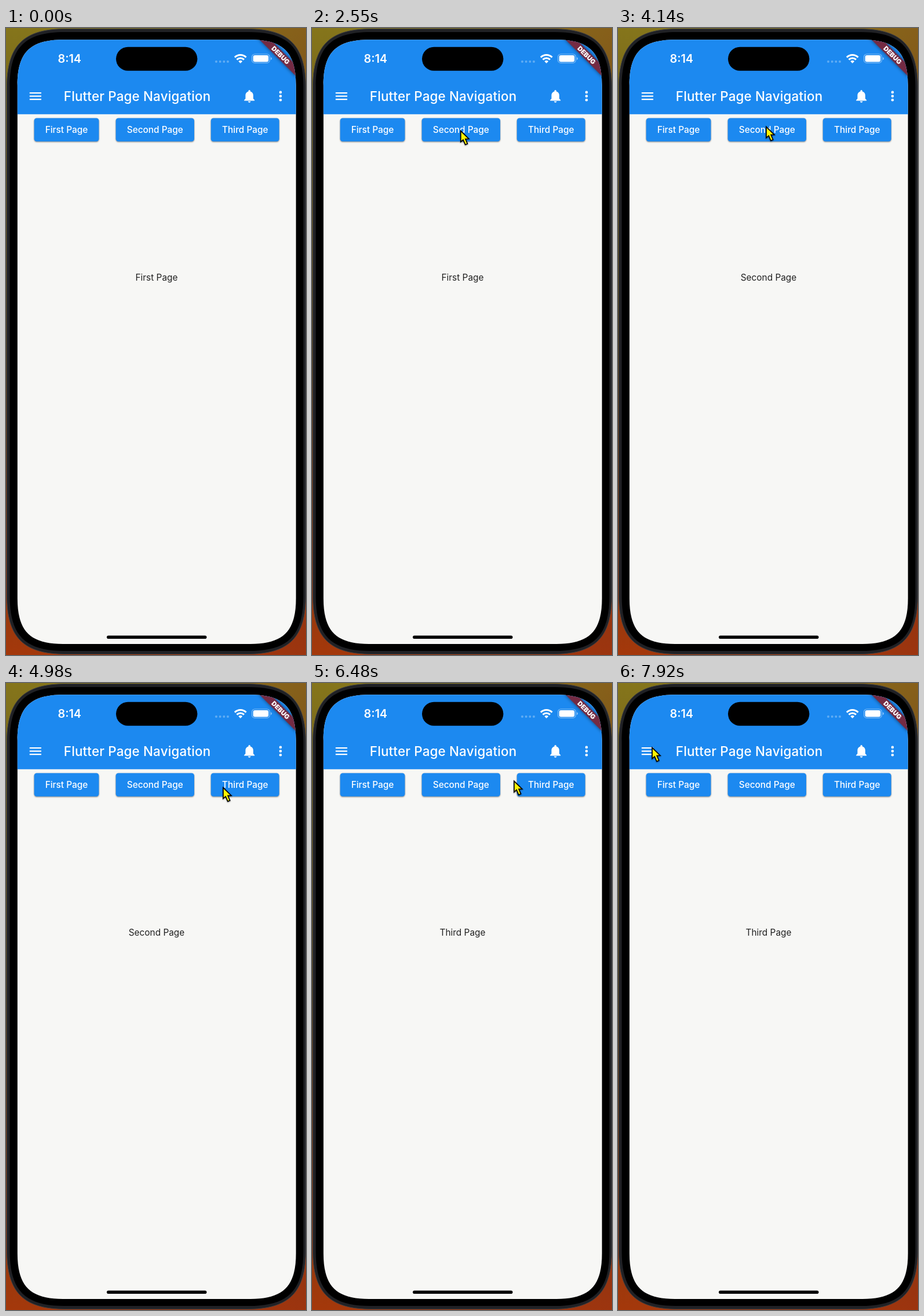
Recreate the animation shown at these times as an HTML page. Size 518x1082 px, loop 8 s.

```html
<!DOCTYPE html>
<html lang="en">
<head>
<meta charset="utf-8">
<title>Page navigation</title>
<style>
  html, body { margin: 0; width: 100%; height: 100%; overflow: hidden; background: #4a3210; }
  svg { display: block; width: 100vw; height: 100vh; font-family: Inter, "Open Sans", sans-serif; }
  .title { font-size: 22.4px; font-weight: 500; letter-spacing: .17px; }
  .label { font-size: 15.4px; font-weight: 500; fill: #fff; text-anchor: middle; }
  .page { font-size: 15.4px; fill: #202020; text-anchor: middle; }
</style>
</head>
<body>
<svg viewBox="0 0 518 1082" preserveAspectRatio="none">
  <defs>
    <linearGradient id="wallpaper" x2="0" y2="1">
      <stop offset="0" stop-color="#85751b"/>
      <stop offset=".5" stop-color="#55401a"/>
      <stop offset="1" stop-color="#a4380b"/>
    </linearGradient>
    <linearGradient id="shade">
      <stop offset=".5" stop-color="#8a2c18" stop-opacity="0"/>
      <stop offset="1" stop-color="#8a2c18" stop-opacity=".3"/>
    </linearGradient>
    <clipPath id="screen"><path id="display"/></clipPath>
  </defs>

  <rect width="518" height="1082" fill="url(#wallpaper)"/>
  <rect width="518" height="1082" fill="url(#shade)"/>
  <path id="frame" fill="#202125" stroke="#3c3d40"/>
  <path id="bezel"/>

  <g clip-path="url(#screen)">
    <rect x="19" y="20" width="482" height="1044" fill="#f7f7f5"/>
    <g id="pages"></g>
    <g id="buttons"></g>
    <rect x="19" y="20" width="482" height="128.8" fill="#1c89f0"/>

    <g fill="#fff">
      <text x="89.5" y="60" font-size="19.8" font-weight="600">8:14</text>
      <text class="title" x="99.8" y="125.7">Flutter Page Navigation</text>
      <g opacity=".3">
        <circle cx="363" cy="58" r="2"/><circle cx="369.7" cy="58" r="2"/>
        <circle cx="376.4" cy="58" r="2"/><circle cx="383" cy="58" r="2"/>
      </g>
      <g fill="none" stroke="#fff" stroke-width="3.1">
        <path d="M395 50.6a13.8 13.8 0 0 1 19.6 0M398.6 54.6a8.8 8.8 0 0 1 12.4 0"/>
      </g>
      <path d="M401.4 57.4a4.8 4.8 0 0 1 6.8 0l-3.4 3.5z"/>
      <rect x="424.6" y="45" width="30.8" height="15.4" rx="5" fill="none" stroke="#fff" stroke-opacity=".42" stroke-width="1.2"/>
      <rect x="426.7" y="47" width="26.6" height="11.4" rx="3.2"/>
      <path d="M457 50.3q2.2 .6 2.2 2.5t-2.2 2.5z" opacity=".45"/>
      <g transform="translate(37.4 104.2) scale(1.1186)"><path d="M3 18h18v-2H3zM3 13h18v-2H3zM3 8h18V6H3z"/></g>
      <g transform="translate(406.8 104.2) scale(1.1186)">
        <path d="M12 22c1.1 0 2-.9 2-2h-4c0 1.1.9 2 2 2zm6-6v-5c0-3.07-1.64-5.64-4.5-6.32V4c0-.83-.67-1.5-1.5-1.5s-1.5.67-1.5 1.5v.68C7.63 5.36 6 7.92 6 11v5l-2 2v1h16v-1z"/>
      </g>
      <circle cx="474" cy="110.9" r="2.3"/><circle cx="474" cy="117.6" r="2.3"/><circle cx="474" cy="124.3" r="2.3"/>
    </g>

    <g transform="translate(501 20) rotate(45)">
      <rect x="-45" y="31.3" width="90" height="13.5" fill="#742b43" style="filter:drop-shadow(0 0 3px #0008)"/>
      <text y="42" fill="#fff" font-size="11.2" font-weight="900" text-anchor="middle">DEBUG</text>
    </g>
    <rect x="190" y="32.8" width="140.4" height="41" rx="20.5"/>
    <rect x="174" y="1048.5" width="172.5" height="5.6" rx="2.8"/>
  </g>

  <path id="cursor" d="M1 1.6V20.4L5.2 16.8 8.9 25.4 12.7 23.7 9.1 15.4 14.9 15.2z" fill="#fff500" stroke="#000"
        stroke-width="1.7" style="filter:drop-shadow(0 1px 1.2px #0006)"/>
</svg>

<script>
const LOOP = 8000, PAGE_WIDTH = 481, SLIDE = 300, HOLD = 100;
const holds = [770, 1610, 2450, 4140, 4980, 5820, 6660, 7500];

// Tap release starts the slide to the button's page.
const buttons = [
  { name: 'First Page', x: 48.6, width: 111.8 },
  { name: 'Second Page', x: 189.6, width: 135.4, release: 3360, tapX: 256 },
  { name: 'Third Page', x: 353.8, width: 117.9, release: 5761, tapX: 382 }
];

// Pointer stops: time, x, y
const pointerPath = [
  [450, 300, 1084], [770, 286, 484], [1250, 263, 332], [1610, 261, 323],
  [1750, 261, 323], [2400, 256, 178], [2900, 255, 169], [4300, 255, 169],
  [4900, 374, 179], [5150, 374, 179], [5550, 382, 175], [6350, 382, 175],
  [6940, 112, 117], [7050, 112, 117], [7750, 58, 110], [8000, 58, 110]
];

const $ = id => document.getElementById(id);
const clamp = v => Math.min(1, Math.max(0, v));
const mix = (a, b, p) => a + (b - a) * p;
const ease = v => { v = clamp(v); return v * v * (3 - 2 * v); };

function add(parent, tag, attributes, text = '') {
  const node = document.createElementNS('http://www.w3.org/2000/svg', tag);
  for (const key in attributes) node.setAttribute(key, attributes[key]);
  node.textContent = text;
  return parent.appendChild(node);
}

// Rounded rectangle whose corners flow gradually into the sides.
function smoothRect(id, x, y, width, height, radius) {
  const reach = radius * 1.28, pull = radius * 0.925, right = width - 2 * reach, down = height - 2 * reach;
  const rest = reach - pull;
  $(id).setAttribute('d', `M${x + reach} ${y}h${right}
    c${pull} 0 ${reach} ${rest} ${reach} ${reach}v${down}
    c0 ${pull} ${-rest} ${reach} ${-reach} ${reach}h${-right}
    c${-pull} 0 ${-reach} ${-rest} ${-reach} ${-reach}v${-down}
    c0 ${-pull} ${rest} ${-reach} ${reach} ${-reach}z`);
}
smoothRect('frame', 1.5, 1.5, 516, 1079, 80);
smoothRect('bezel', 6.5, 7, 507, 1068, 74);
smoothRect('display', 19.8, 20.3, 480.9, 1042.6, 61.5);

buttons.forEach((b, i) => {
  add($('pages'), 'text', { class: 'page', x: 260 + i * PAGE_WIDTH, y: 436.3 }, b.name);
  const box = { x: b.x, y: 155.4, width: b.width, height: 40.3, rx: 4.5 };
  b.face = add($('buttons'), 'rect', { ...box, fill: '#1c89f0' });
  add(add($('buttons'), 'clipPath', { id: 'clip' + i }), 'rect', box);
  const layer = add($('buttons'), 'g', { 'clip-path': `url(#clip${i})` });
  b.ripple = add(layer, 'circle', { fill: '#fff' });
  add($('buttons'), 'text', { class: 'label', x: b.x + b.width / 2, y: 181 }, b.name);
});

function drawButton(b, time) {
  const since = time - (b.release ?? Infinity);
  const spread = ease((since + 141) / 330);
  const lift = ease((since + 140) / 180) * (1 - ease((since - 120) / 200));
  const opacity = 0.19 * clamp((since + 141) / 75) * (1 - clamp((since - 225) / 375));
  const center = b.x + b.width / 2;
  b.ripple.setAttribute('cx', mix(b.tapX ?? center, center, spread));
  b.ripple.setAttribute('cy', 176);
  b.ripple.setAttribute('r', (Math.hypot(b.width, 40) / 2 + 5) * mix(0.3, 1, spread));
  b.ripple.setAttribute('opacity', opacity);
  b.face.style.filter = `drop-shadow(0 ${mix(1.7, 3.2, lift)}px ${mix(1.3, 2.6, lift)}px #0007)`;
}

function drawPointer(time) {
  const next = pointerPath.findIndex(stop => stop[0] > time);
  $('cursor').style.display = next > 0 ? '' : 'none';
  if (next < 1) return;
  const [t0, x0, y0] = pointerPath[next - 1], [t1, x1, y1] = pointerPath[next];
  const p = ease((time - t0) / (t1 - t0));
  $('cursor').setAttribute('transform', `translate(${mix(x0, x1, p)} ${mix(y0, y1, p)})`);
}

function draw(now) {
  let time = now % LOOP;
  time = holds.find(start => time >= start && time < start + HOLD) ?? time;
  const page = buttons.reduce((sum, b) => sum + (b.release ? ease((time - b.release) / SLIDE) : 0), 0);
  $('pages').setAttribute('transform', `translate(${-page * PAGE_WIDTH} 0)`);
  buttons.forEach(b => drawButton(b, time));
  drawPointer(time);
}

const start = performance.now();
function tick() {
  draw(performance.now() - start);
  requestAnimationFrame(tick);
}
tick();
</script>
</body>
</html>
```
